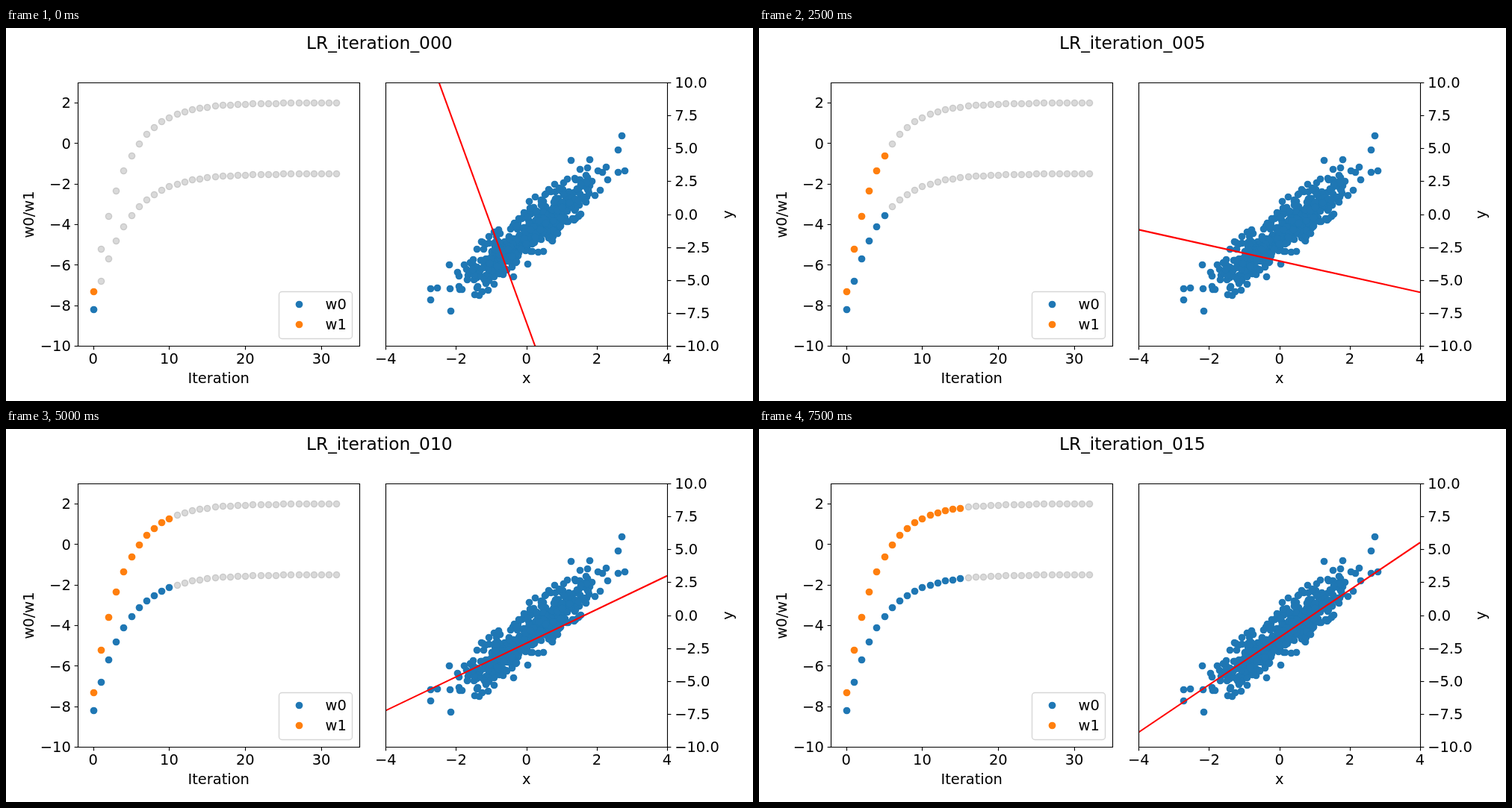
Animation of 1000 by 500 pixels, one loop 8 s. Source, as an HTML page:

```html
<!DOCTYPE html>
<html lang="en">
<head>
<meta charset="utf-8">
<title>Linear regression iterations</title>
<style>
  html, body { margin: 0; width: 100%; height: 100%; overflow: hidden; background: #fff; }
  svg { display: block; width: 1000px; height: 500px; }
  text { font: 19.44px "DejaVu Sans", sans-serif; fill: #000; }
  .title { font-size: 23.33px; }
  .axis { fill: none; stroke: #000; stroke-width: 1.11; }
  .pending { fill: #808080; fill-opacity: .3; stroke: #808080; stroke-opacity: .3; stroke-width: 1.39; }
</style>
</head>
<body>
<svg id="stage" viewBox="0 0 1000 500">
  <clipPath id="plotArea"><rect x="508" y="73" width="377" height="353"/></clipPath>
</svg>
<script>
const STEP_MS = 500, STEPS = 16, ITERATIONS = 33, SAMPLES = 490;
const BLUE = '#1f77b4', ORANGE = '#ff7f0e';
const TOP = 72.9, BOTTOM = 426.2;
const stage = document.getElementById('stage');

function add(tag, attrs, content) {
  const node = document.createElementNS('http://www.w3.org/2000/svg', tag);
  for (const key in attrs) node.setAttribute(key, attrs[key]);
  if (content !== undefined) node.textContent = content;
  return stage.appendChild(node);
}
const label = (x, y, content, anchor = 'middle', extra = {}) =>
  add('text', { x, y, 'text-anchor': anchor, ...extra }, content);
const snap = v => Math.round(v) + 0.5;
const dot = (x, y, fill) => add('circle', { cx: snap(x), cy: snap(y), r: 4.86, fill });
const scale = (a, b, from, to) => v => from + (v - a) / (b - a) * (to - from);
const signed = text => String(text).replace('-', '\u2212');

const iterX = scale(-2, 35, 96.3, 473);
const weightY = scale(-10, 3, BOTTOM, TOP);
const dataX = scale(-4, 4, 508.3, 885);
const dataY = scale(-10, 10, BOTTOM, TOP);

// Both weights approach their optimum geometrically.
const w0 = k => -1.49 - 6.71 * 0.79 ** k;
const w1 = k => 2 - 9.32 * 0.7743 ** k;

// Seeded uniform and normal generators
let seed = 11;
function random() {
  seed = (seed + 0x6D2B79F5) | 0;
  let t = Math.imul(seed ^ (seed >>> 15), 1 | seed);
  t = (t + Math.imul(t ^ (t >>> 7), 61 | t)) ^ t;
  return ((t ^ (t >>> 14)) >>> 0) / 4294967296;
}
const normal = () =>
  Math.sqrt(-2 * Math.log(1 - random())) * Math.cos(2 * Math.PI * random());

// Samples of y = 2x - 1.5 with unit noise, plus the few extreme ones
function drawCloud() {
  const extremes = [[2.7, 6], [2.6, 4.9], [2.79, 3.3], [2.6, 3.2], [1.79, 4.15], [1.26, 4.1],
    [-2.73, -5.65], [-2.73, -6.5], [-2.54, -5.6], [-2.16, -7.35], [-2.2, -3.8]];
  extremes.forEach(([x, y]) => dot(dataX(x), dataY(y), BLUE));
  for (let count = 0; count < SAMPLES;) {
    const x = normal(), noise = normal();
    if (Math.hypot(x / 2.35, noise / 2.6) > 1) continue;
    dot(dataX(x), dataY(2 * x - 1.5 + noise), BLUE);
    count++;
  }
}

function drawAxes() {
  const axis = d => add('path', { d, class: 'axis' });
  const top = snap(TOP), bottom = snap(BOTTOM);
  for (const [left, right] of [[96.5, 473.5], [508.5, 885.5]])
    axis(`M${left} ${top}H${right}V${bottom}H${left}Z`);

  function tickX(x, value) {
    axis(`M${snap(x)} ${bottom}v4.86`);
    label(x, 450, signed(value));
  }
  function tickY(edge, length, y, value, anchor) {
    axis(`M${edge} ${snap(y)}h${length}`);
    label(edge + 2 * length, y + 7.1, signed(value), anchor);
  }
  for (let v = 0; v <= 30; v += 10) tickX(iterX(v), v);
  for (let v = -4; v <= 4; v += 2) tickX(dataX(v), v);
  for (let v = -10; v <= 2; v += 2) tickY(96.5, -4.86, weightY(v), v, 'end');
  for (let v = -10; v <= 10; v += 2.5) tickY(885.5, 4.86, dataY(v), v.toFixed(1), 'start');

  label(284.7, 476, 'Iteration');
  label(696.7, 476, 'x');
  label(0, 0, 'w0/w1', 'middle', { transform: 'translate(37 250) rotate(-90)' });
  label(0, 0, 'y', 'middle', { transform: 'translate(973 250) rotate(-90)' });
}

function drawLegend() {
  add('rect', { x: 365.5, y: 353.5, width: 98, height: 63, rx: 3.9,
    fill: '#fff', stroke: '#ccc', 'stroke-opacity': .8, 'stroke-width': 1.39 });
  [['w0', BLUE, 370], ['w1', ORANGE, 397]].forEach(([name, color, y]) => {
    dot(392, y, color);
    label(427.6, y + 6.5, name, 'start');
  });
}

const weightDots = [];
for (const [weight, color] of [[w0, BLUE], [w1, ORANGE]])
  for (let k = 0; k < ITERATIONS; k++)
    weightDots.push({ k, node: dot(iterX(k), weightY(weight(k)), color) });

drawCloud();
const fitLine = add('line', { x1: dataX(-4), x2: dataX(4), stroke: '#f00',
  'stroke-width': 2.08, 'clip-path': 'url(#plotArea)' });
drawAxes();
drawLegend();
const title = label(499.8, 28, '', 'middle', { class: 'title' });

function show(step) {
  title.textContent = 'LR_iteration_' + String(step).padStart(3, '0');
  for (const { k, node } of weightDots) {
    const reached = k <= step;
    node.setAttribute('class', reached ? '' : 'pending');
    node.setAttribute('r', reached ? 4.86 : 4.17);
  }
  fitLine.setAttribute('y1', dataY(w0(step) - 4 * w1(step)));
  fitLine.setAttribute('y2', dataY(w0(step) + 4 * w1(step)));
}

const start = performance.now();
let shown = -1;
function frame() {
  const step = Math.floor((performance.now() - start) / STEP_MS) % STEPS;
  if (step !== shown) show(shown = step);
  requestAnimationFrame(frame);
}
frame();
</script>
</body>
</html>
```
